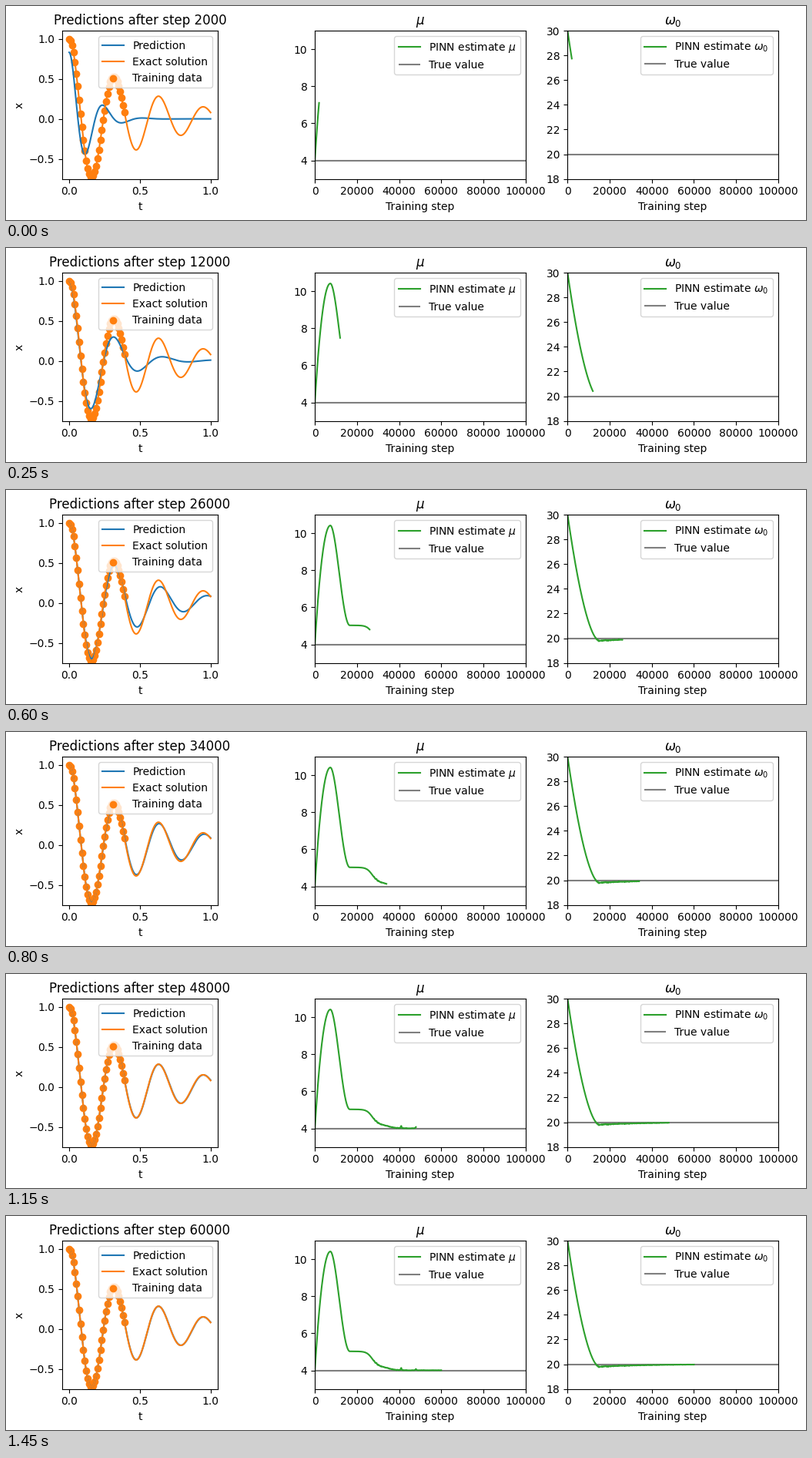
Write a matplotlib script that moves like this. It is 1039 px wide and 278 px high and loops after 1500 ms.

```python
import matplotlib.pyplot as plt
import numpy as np
from matplotlib.animation import FuncAnimation

WIDTH, HEIGHT, DPI = 1039, 278, 100
FRAMES, INTERVAL, STEPS_PER_FRAME = 30, 50, 2000
DAMPING, OMEGA = 2, 20
FREQ = np.sqrt(OMEGA**2 - DAMPING**2)

plt.rcParams["font.family"] = "DejaVu Sans"


def oscillator(t):
    phase = np.arctan(-DAMPING / FREQ)
    return np.exp(-DAMPING * t) * np.cos(FREQ * t + phase) / np.cos(phase)


def drop(s, center, width):
    """Logistic step from 1 down to 0."""
    return 1 / (1 + np.exp((s - center) / width))


# Trends of the estimates, with s in thousands of training steps
def mu_trend(s, peak=10.42, peak_at=7.4):
    rise = peak - (peak - 4) * np.clip(1 - s / peak_at, 0, 1) ** 2.1
    fall = np.cos(np.pi / 2 * np.clip((s - peak_at) / 9.2, 0, 1) ** 0.92) ** 2
    plateau = 4.01 + 0.77 * drop(s, 27.2, 1.3) + 0.25 * drop(s, 34, 2.2)
    return np.where(s < peak_at, rise, plateau + (peak - plateau) * fall)


def omega_trend(s, lowest=19.8, lowest_at=15):
    fall = lowest + (30 - lowest) * np.clip(1 - s / lowest_at, 0, 1) ** 1.745
    recovery = OMEGA - (OMEGA - lowest) * np.exp(-(s - lowest_at) / 22)
    return np.where(s < lowest_at, fall, recovery)


def prediction(t, s):
    """Oscillation with too much damping and a lagging phase, both fading with training."""
    excess = (mu_trend(s) - 4) * (0.9 + 1.7 * np.exp(-(s - 2) / 2.5))
    start = 1 - 0.17 * np.exp(-(s - 2) / 2)
    warped = t * omega_trend(s) / OMEGA * (1 - 0.035 * excess * t)
    drift = 0.07 * np.exp(-((s - 20) / 5) ** 2) * t**2
    return start * np.exp(-excess * t**1.5) * oscillator(warped) + drift


steps = np.arange(0, FRAMES * STEPS_PER_FRAME + 1, 100)
k_steps = steps / 1000
rng = np.random.default_rng(4)


def jitter(start, size, fade):
    noise = np.convolve(rng.normal(size=len(steps)), np.ones(3) / 3, "same")
    return size * noise * (k_steps > start) * np.exp(-np.maximum(k_steps - start, 0) / fade)


def blip(center, height):
    return height * np.exp(-((k_steps - center) / 0.25) ** 2)


mu = mu_trend(k_steps) + jitter(28, 0.025, 15) + blip(41, 0.11) + blip(48, 0.07)
omega = omega_trend(k_steps) + jitter(13, 0.04, 22)

# Layout in pixels
fig = plt.figure(figsize=(WIDTH / DPI, HEIGHT / DPI), dpi=DPI, facecolor="white")
LEFT, BOTTOM, PLOT_W, PLOT_H = 72.88, 53.35, 273.53, 192.5


def add_axes(column, width, xlim, ylim, xticks, yticks, xlabel):
    left = LEFT + column * PLOT_W * 1.2
    ax = fig.add_axes((left / WIDTH, BOTTOM / HEIGHT, width / WIDTH, PLOT_H / HEIGHT))
    ax.set(xlim=xlim, ylim=ylim, xticks=xticks, yticks=yticks, xlabel=xlabel)
    return ax


def add_history(column, symbol, true_value, ylim, yticks):
    ax = add_axes(column, PLOT_W, (0, 100000), ylim, range(0, 100001, 20000),
                  yticks, "Training step")
    line, = ax.plot([], [], color="tab:green", zorder=2.1, label=f"PINN estimate {symbol}")
    ax.hlines(true_value, 0, 100000, color="tab:gray", label="True value")
    ax.set_title(symbol)
    ax.legend(loc="upper right")
    return line


t = np.linspace(0, 1, 500)
t_train = t[:200:5]
ax = add_axes(0, 202, (-0.05, 1.05), (-0.75, 1.1), (0, 0.5, 1), (-0.5, 0, 0.5, 1), "t")
ax.set_ylabel("x")
pred_line, = ax.plot([], [], color="tab:blue", label="Prediction")
ax.plot(t, oscillator(t), color="tab:orange", label="Exact solution")
ax.scatter(t_train, oscillator(t_train), color="tab:orange", label="Training data")
ax.legend(loc="upper right")
title = ax.set_title("")

mu_line = add_history(1, r"$\mu$", 2 * DAMPING, (3, 11), range(4, 11, 2))
omega_line = add_history(2, r"$\omega_0$", OMEGA, (18, 30), range(18, 31, 2))


def update(frame):
    step = (frame + 1) * STEPS_PER_FRAME
    seen = steps <= step
    pred_line.set_data(t, prediction(t, step / 1000))
    mu_line.set_data(steps[seen], mu[seen])
    omega_line.set_data(steps[seen], omega[seen])
    title.set_text(f"Predictions after step {step}")
    return pred_line, mu_line, omega_line, title


anim = FuncAnimation(fig, update, frames=FRAMES, interval=INTERVAL, repeat=True, repeat_delay=0)
plt.show()
```
